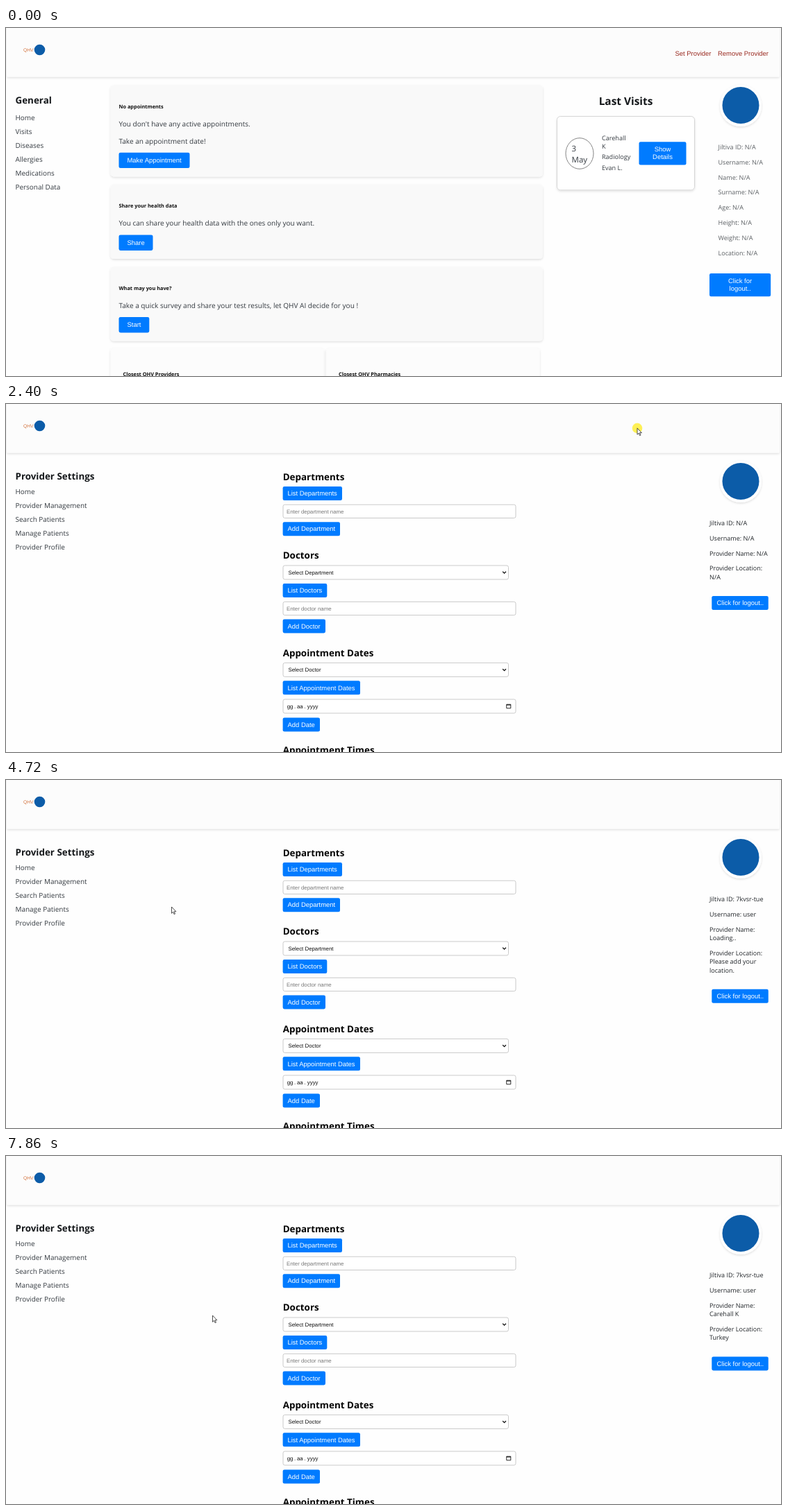
Write an HTML page that moves like this. It is 1116 px wide and 502 px high and loops after 8 s.

```html
<!DOCTYPE html>
<html lang="en">
<head>
<meta charset="utf-8">
<title>Health portal</title>
<style>
html, body { margin: 0; width: 100%; height: 100%; overflow: hidden; background: #fefefe; }
svg { display: block; width: 1116px; height: 502px; }
text { font-family: "Open Sans", "Noto Sans", sans-serif; fill: #343a40; text-rendering: geometricPrecision; white-space: pre; }
.arial { font-family: "Liberation Sans", Arial, sans-serif; }
.title { font-weight: 700; font-size: 13.4px; fill: #15181b; }
.dark { fill: #050505; }
.sub { font-weight: 700; font-size: 7.35px; fill: #111; }
.body { font-size: 10.05px; }
.menu { font-size: 9.95px; }
.info { font-size: 9.05px; }
.link { font-size: 9.45px; fill: #9a2a20; }
.btn { font-size: 9.45px; fill: #fff; }
.field { font-size: 7.85px; fill: #111; }
.hint { fill: #777; }
.mid { text-anchor: middle; }
</style>
</head>
<body>
<svg id="stage" viewBox="0 0 1116 502" xmlns="http://www.w3.org/2000/svg"></svg>
<script>
const LOOP = 8000;
const BLUE = '#007bff', HOVER = '#0056b3', MARK = '#0c5ca8';

const text = (x, y, cls, str) => `<text x="${x}" y="${y}" class="${cls}">${str}</text>`;
const box = (x, y, w, h, r, fill, extra = '') =>
  `<rect x="${x}" y="${y}" width="${w}" height="${h}" rx="${r}" fill="${fill}" ${extra}/>`;
const circle = (x, y, r, fill, extra = '') =>
  `<circle cx="${x}" cy="${y}" r="${r}" fill="${fill}" ${extra}/>`;
const card = (x, y, w, h) => box(x, y, w, h, 5, '#f9f9f9', 'filter="url(#shadow)"');
const button = (x, y, w, h, pad, label, id = '') =>
  box(x, y, w, h, 2.3, BLUE, id) + text(x + pad, y + h / 2 + 3.2, 'arial btn', label);
const tallButton = (x, y, w, lines) => box(x, y, w, 33.3, 2.3, BLUE) +
  lines.map((s, i) => text(x + w / 2, y + 14.2 + i * 11, 'arial btn mid', s)).join('');
const menu = (title, y, items) => text(13.5, 109, 'title', title) +
  items.map((s, i) => text(13.5, y + 20 * i, 'menu', s)).join('');

const outline = 'stroke="#c4c4c4" stroke-width=".9"';
const input = (y, hint) => box(399, y, 335, 19.3, 2.5, '#fff', outline) + text(404, y + 12.5, 'arial field hint', hint);
const select = (y, label) => box(399, y, 324.5, 20, 2.5, '#fff', outline) +
  text(406.5, y + 12.8, 'arial field', label) +
  `<path d="M715.2 ${y + 8.8}l2.4 2.4 2.4-2.4" fill="none" stroke="#111" stroke-width="1.3"/>`;
const formButton = (y, w, label, id) => button(398.6, y, w, 20, 6.9, label, id);

function chrome() {
  return `<defs><filter id="shadow" x="-10%" y="-10%" width="120%" height="130%">
    <feDropShadow dx="0" dy="1.4" stdDeviation="1.5" flood-opacity=".13"/></filter></defs>` +
    box(0, 0, 1116, 502, 0, '#fefefe') +
    box(1, -4, 1113, 74.5, 2, '#fcfcfc', 'filter="url(#shadow)"') +
    `<text x="25" y="33.6" class="arial" style="font-size:6.7px;fill:#d2703a">QHV</text>` +
    circle(48.5, 31.5, 7.8, MARK) +
    circle(1058, 112, 30, '#fff', 'filter="url(#shadow)"') + circle(1058, 111.5, 26.5, MARK);
}

function patientPage() {
  const section = (y, h, title, lines, label, w) => {
    const last = y + 59 + 24.7 * (lines.length - 1);
    return card(150.5, y, 622.5, h) + text(162.5, y + 33.3, 'sub', title) +
      lines.map((s, i) => text(162.5, y + 59.2 + 24.7 * i, 'body', s)).join('') +
      button(162.5, last + 13.4, w, 22.4, 12, label);
  };
  return menu('General', 133, ['Home', 'Visits', 'Diseases', 'Allergies', 'Medications', 'Personal Data']) +
    section(82.6, 131.9, 'No appointments',
      ["You don't have any active appointments.", 'Take an appointment date!'], 'Make Appointment', 102) +
    section(226.1, 107, 'Share your health data',
      ['You can share your health data with the ones only you want.'], 'Share', 49) +
    section(344.6, 107, 'What may you have?',
      ['Take a quick survey and share your test results, let QHV AI decide for you !'], 'Start', 43.8) +
    box(150.5, 462, 307, 60, 4, '#fcfcfc', 'filter="url(#shadow)"') +
    box(461, 462, 307.5, 60, 4, '#fcfcfc', 'filter="url(#shadow)"') +
    text(168.5, 502, 'sub', 'Closest QHV Providers') + text(479, 502, 'sub', 'Closest QHV Pharmacies') +
    '<text x="892.5" y="111" class="title mid" style="font-size:15.4px">Last Visits</text>' +
    box(793.5, 127.5, 198, 106.3, 5, '#fff', 'stroke="#d2d2d2" stroke-width=".9" filter="url(#shadow)"') +
    '<ellipse cx="826" cy="181" rx="20" ry="22.3" fill="#fff" stroke="#777" stroke-width=".9"/>' +
    '<g style="font-size:11.5px">' + text(814.5, 178, '', '3') + text(814.5, 194, '', 'May') + '</g>' +
    text(858, 161.5, 'info', 'Carehall') + text(858, 174, 'info', 'K') +
    text(858, 189.2, 'info', 'Radiology') + text(858, 204.5, 'info', 'Evan L.') +
    tallButton(911.5, 164.2, 68, ['Show', 'Details']) +
    text(963.5, 39.5, 'arial link', 'Set Provider') + text(1025, 39.5, 'arial link', 'Remove Provider') +
    tallButton(1013, 354, 88.2, ['Click for', 'logout..']);
}

function providerPage() {
  return menu('Provider Settings', 130, ['Home', 'Provider Management', 'Search Patients', 'Manage Patients', 'Provider Profile']) +
    text(398.7, 109.5, 'title dark', 'Departments') +
    formButton(119, 85.4, 'List Departments', 'id="listButton"') + input(145.2, 'Enter department name') +
    formButton(170.2, 82.4, 'Add Department') +
    text(398.7, 223.2, 'title dark', 'Doctors') + select(233, 'Select Department') +
    formButton(259.1, 63.7, 'List Doctors') + input(285.3, 'Enter doctor name') + formButton(310.4, 61.4, 'Add Doctor') +
    text(398.7, 363.5, 'title dark', 'Appointment Dates') + select(373.4, 'Select Doctor') +
    formButton(399.3, 111.4, 'List Appointment Dates') +
    box(399, 426, 335, 20, 2.5, '#fff', outline) +
    [[404.7, 'gg'], [415, '.'], [419, 'aa'], [429.3, '.'], [433.8, 'yyyy']]
      .map(([x, s]) => text(x, 438.7, 'arial field', s)).join('') +
    '<path d="M720.8 433.3h6v5.6h-6zM720.8 434.2h6" fill="none" stroke="#111" stroke-width=".9"/>' +
    formButton(452.5, 53.4, 'Add Date') +
    text(398.7, 504.3, 'title dark', 'Appointment Times');
}

// Each entry is one paragraph; a line break inside it wraps.
function paragraphs(x, items, colour) {
  let y = 174.8, out = '';
  for (const item of items) {
    for (const line of item.split('\n')) {
      out += `<text x="${x}" y="${y.toFixed(1)}" class="info" style="fill:${colour}">${line}</text>`;
      y += 12.4;
    }
    y += 9.45;
  }
  return { out, end: y };
}

function patientInfo(loaded) {
  const keys = ['Jiltiva ID', 'Username', 'Name', 'Surname', 'Age', 'Height', 'Weight', 'Location'];
  const values = ['7kvsr-tue', 'user', 'Evan', 'Lyn', '22', '177', '70', 'Turkey'];
  const lines = keys.map((k, i) => `${k}: ${loaded ? values[i] : 'N/A'}`);
  return paragraphs(loaded ? 1016 : 1025.5, lines, '#5c6064').out +
    (loaded ? text(882, 39.5, 'arial link', 'Provider Settings') : '');
}

function providerInfo(stage) {
  const [id, user, name, place] = [
    ['N/A', 'N/A', ' N/A', '\nN/A'],
    ['7kvsr-tue', 'user', '\nLoading..', '\nPlease add your\nlocation.'],
    ['7kvsr-tue', 'user', '\nCarehall K', '\nTurkey']
  ][stage];
  const { out, end } = paragraphs(1013,
    [`Jiltiva ID: ${id}`, `Username: ${user}`, `Provider Name:${name}`, `Provider Location:${place}`], '#212529');
  return out + button(1016.3, end + 2.4, 81.5, 20, 7.2, 'Click for logout..');
}

// Pointer waypoints: time, x, y
const PATH = [
  [260, 451, 412], [550, 801, 288], [730, 801, 288], [900, 799, 325], [1160, 807, 312], [1360, 807, 312],
  [1710, 917, 59], [2130, 909, 34.8], [2480, 909, 34.8], [2970, 583, 83], [3040, 565, 92],
  [3560, 202, 205], [3740, 227.5, 233], [3940, 227.5, 233], [4250, 206, 208], [4720, 238.5, 183],
  [4790, 238.5, 183], [5490, 431.5, 130.2], [7230, 431.5, 130.2], [7480, 160, 270], [7640, 150, 334], [7860, 297.5, 230]
];

function pointerAt(t) {
  const i = PATH.findIndex(p => p[0] > t);
  if (i < 0) return PATH[PATH.length - 1].slice(1);
  const [t0, x0, y0] = PATH[i - 1], [t1, x1, y1] = PATH[i];
  const u = (t - t0) / (t1 - t0), e = u * u * (3 - 2 * u);
  return [x0 + (x1 - x0) * e, y0 + (y1 - y0) * e];
}

const stage = document.getElementById('stage');
stage.innerHTML = chrome() +
  `<g id="patient">${patientPage()}</g><g id="provider">${providerPage()}</g><g id="info"></g>` +
  circle(0, 0, 7.3, '#ffec1f', 'id="click"') +
  `<g id="pointer" fill="#fff" stroke="#222" stroke-width=".8" stroke-linejoin="round">
    <path id="arrow" d="M0 0v9.3l2.1-2 1.5 3.4 1.4-.6-1.5-3.3h2.9z"/>
    <path id="hand" d="M-.6 8V1.6a.9 .9 0 0 1 1.8 0V5l4 .8q1 .3 .9 1.4l-.6 5h-5L-2.4 8.6q-.2-1.6 1.8-.6z"/></g>`;

const el = id => document.getElementById(id);
const show = (id, on) => el(id).setAttribute('display', on ? 'inline' : 'none');
const between = (t, a, b) => t >= a && t < b;
let infoState = '';

function render(t) {
  const onPatient = t < 2270;
  show('patient', onPatient);
  show('provider', !onPatient);

  const level = onPatient ? +(t >= 940) : (t >= 4330) + (t >= 6820);
  const state = `${onPatient}${level}`;
  if (state !== infoState) {
    infoState = state;
    el('info').innerHTML = onPatient ? patientInfo(level) : providerInfo(level);
  }

  const visible = t >= 260;
  show('pointer', visible);
  const [x, y] = visible ? pointerAt(t) : [0, 0];
  const overList = !onPatient && x > 399 && x < 484 && y > 119 && y < 139;
  const overLink = onPatient && level && x > 882 && x < 954 && y > 30 && y < 43;
  show('hand', overList || overLink);
  show('arrow', !(overList || overLink));
  el('pointer').setAttribute('transform', `translate(${x} ${y})`);
  el('listButton').setAttribute('fill', overList ? HOVER : BLUE);

  show('click', between(t, 2200, 2480) || between(t, 5890, 6820));
  el('click').setAttribute('transform', `translate(${x} ${y})`);
  el('click').setAttribute('opacity', overList ? .6 : .75);
}

const start = performance.now();
function tick() {
  render((performance.now() - start) % LOOP);
  requestAnimationFrame(tick);
}
tick();
</script>
</body>
</html>
```
